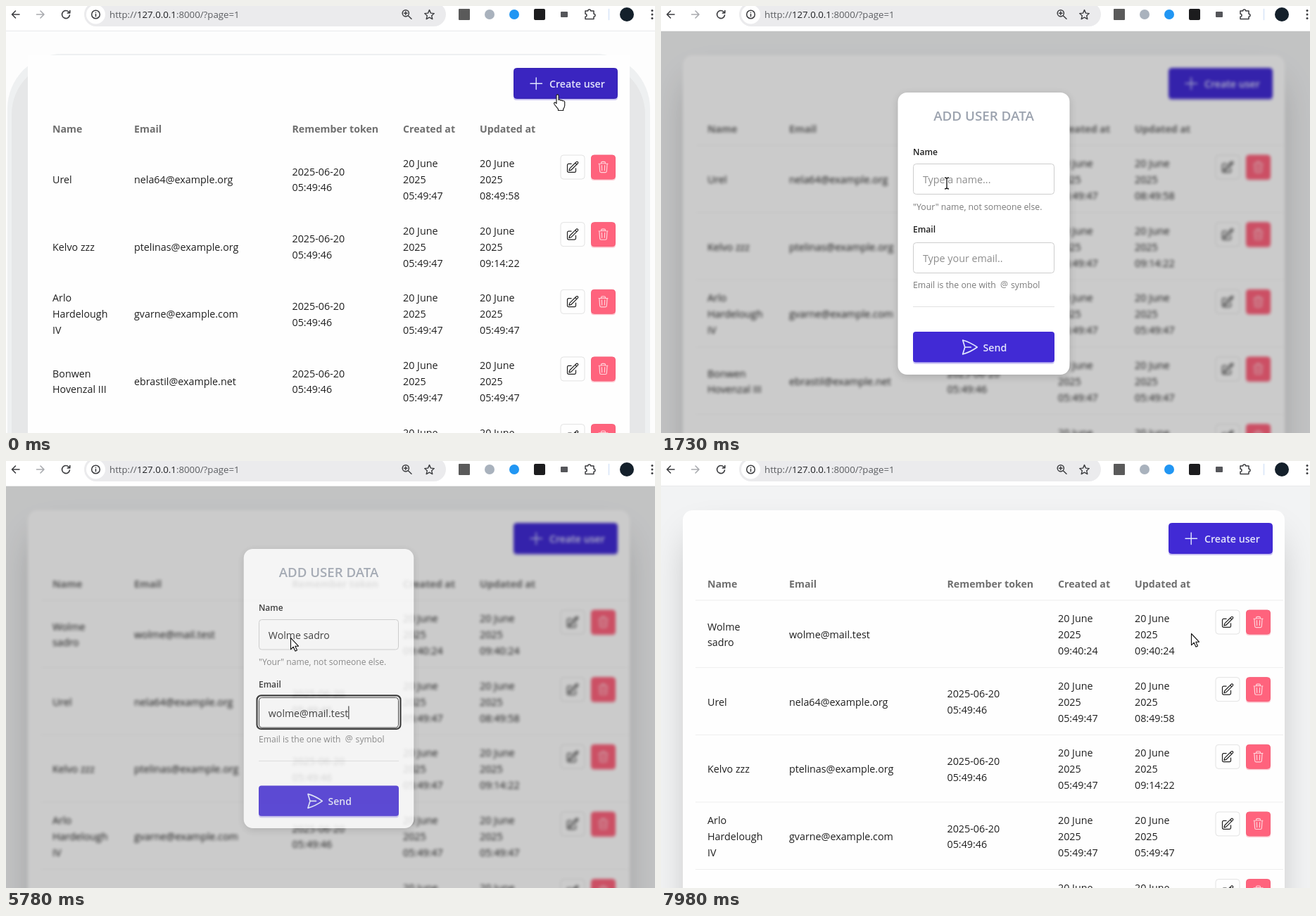
These frames come from a looping animation (922 px wide and 607 px high, 8 s). An HTML page:

```html
<!DOCTYPE html>
<html lang="en">
<head>
<meta charset="utf-8">
<title>User table</title>
<style>
  html, body { margin: 0; width: 100%; height: 100%; overflow: hidden; background: #fff; }
  svg { display: block; width: 922px; height: 607px; }
  text { font: 14.3px "Open Sans", "Noto Sans", sans-serif; fill: #1f1f1f; white-space: pre; }
  .head { font-weight: 700; font-size: 14.2px; fill: #6f6f6f; }
  .btn { font-weight: 600; font-size: 14.2px; fill: #e3e5fb; }
  .title { font-weight: 600; font-size: 18.8px; fill: #9ca3af; text-anchor: middle; }
  .label { font-weight: 600; font-size: 12.1px; }
  .hint { font-size: 12.25px; fill: #7b7b7b; }
  .url { font-size: 13.25px; fill: #5c5e62; }
  .line { fill: none; stroke-linecap: round; stroke-linejoin: round; }
</style>
</head>
<body>
<svg id="stage" viewBox="0 0 922 607"></svg>
<script>
const LOOP = 8000;
const PERSON = "Wolme sadro", MAIL = "wolme@mail.test";
const PITCH = 95.65;
const STAMP = "05:49:47";

// name lines, email, has token, created, updated
const rows = [
  [["Urel"], "nela64@example.org", 1, STAMP, "08:49:58"],
  [["Kelvo zzz"], "ptelinas@example.org", 1, STAMP, "09:14:22"],
  [["Arlo", "Hardelough", "IV"], "gvarne@example.com", 1, STAMP, STAMP],
  [["Bonwen", "Hovenzal III"], "ebrastil@example.net", 1, STAMP, STAMP],
  [[], "", 0, STAMP, STAMP]
];
const added = [PERSON.split(" "), MAIL, 0, "09:40:24", "09:40:24"];

const text = (x, y, s, cls = "") => `<text x="${x}" y="${y}" class="${cls}">${s}</text>`;
const rect = (x, y, w, h, r, fill, extra = "") =>
  `<rect x="${x}" y="${y}" width="${w}" height="${h}" rx="${r}" fill="${fill}" ${extra}/>`;
const circle = (x, y, r, fill, extra = "") => `<circle cx="${x}" cy="${y}" r="${r}" fill="${fill}" ${extra}/>`;
const line = (d, color, width = 1.5, extra = "") =>
  `<path class="line" d="${d}" stroke="${color}" stroke-width="${width}" ${extra}/>`;
const icon = (d, cx, cy, scale, color) =>
  line(d, color, 1.5, `transform="translate(${cx} ${cy}) scale(${scale}) translate(-12 -12)"`);
const stack = (x, mid, lines) =>
  lines.map((s, i) => text(x, mid + (i - (lines.length - 1) / 2) * 22.9, s)).join("");

const PENCIL = "M16.9 4.5l1.7-1.7a1.9 1.9 0 1 1 2.6 2.7L10.6 16.1a4.5 4.5 0 0 1-1.9 1.1L6 18l.8-2.7a4.5 4.5 0 0 1 1.1-1.9zM16.9 4.5l2.6 2.6M18 14v4.8A2.2 2.2 0 0 1 15.8 21H5.2A2.2 2.2 0 0 1 3 18.8V8.2A2.2 2.2 0 0 1 5.2 6H10";
const TRASH = "M9.3 9l.3 9M14.7 9l-.3 9M3.8 6Q12 4.6 20.3 6M4.8 6l1 13.7Q6 21.7 8 21.7h8Q18 21.7 18.2 19.7L19.2 6M8.2 5.3V4.5Q8.2 2.3 10.3 2.3h3.4Q15.8 2.3 15.8 4.5V5.3";
const PLANE = "M6 12L3.3 3.1A59.8 59.8 0 0 1 21.5 12 59.8 59.8 0 0 1 3.3 20.9L6 12h7.5";

function table(list) {
  return list.slice(0, 5).map(([name, mail, token, made, changed], i) => {
    const mid = 252 + i * PITCH;
    const day = ["20 June", "2025"];
    return stack(66, mid, name) + text(182, mid, mail) +
      (token ? stack(406.5, mid, ["2025-06-20", "05:49:46"]) : "") +
      stack(564, mid, [...day, made]) + stack(673, mid, [...day, changed]);
  }).join("");
}

function rowButtons(i) {
  const y = 211.5 + i * PITCH;
  return rect(788, y + .5, 34, 34, 4, "#fefefe", 'stroke="#e3e3e3"') +
    icon(PENCIL, 804.7, y + 17.7, .8, "#222") +
    rect(831, y + 1.5, 35, 35, 4, "#ff637d", 'opacity=".35"') +
    rect(831.5, y + .5, 34, 34, 4, "#ff637d", 'stroke="#f65f78"') +
    icon(TRASH, 848.5, y + 17.5, .78, "#ffd5dc");
}

function toolbar() {
  const dark = "#3c3d40";
  return rect(0, 0, 922, 35.5, 0, "#fff") +
    rect(111, -5, 514, 34, 17, "#ebebed") + circle(127.5, 12, 13.5, "#fff") +
    line("M19 12H8.5M13.5 7L8.5 12l5 5", dark, 1.6) +
    line("M43.5 12H54M49 7l5 5-5 5", "#a9abaf", 1.6) +
    line("M89.5 8.8A5.5 5.5 0 1 0 90.5 13M90.8 6.5V10H87.3", dark, 1.6) +
    circle(127.5, 12, 5.8, "none", `stroke="${dark}" stroke-width="1.5"`) +
    line("M127.5 11.5V14.8M127.5 9.2v.1", dark, 1.6) +
    `<text class="url" x="147" y="17">http://<tspan fill="#202124">127.0.0.1</tspan>:8000/?page=1</text>` +
    circle(567.8, 10.3, 4.6, "none", `stroke="${dark}" stroke-width="1.5"`) +
    line("M571.3 13.8L576 18.2M565.6 10.3h4.4M567.8 8.1v4.4", dark) +
    line("M601.5 5.6l2 4.5 4.8.5-3.6 3.2 1.1 4.8-4.3-2.5-4.3 2.5 1.1-4.8-3.6-3.2 4.8-.5z", dark, 1.4) +
    rect(643, 4, 16, 16, 1, "#5a5a5a") + circle(687, 12, 7, "#a9b2bd") +
    circle(722, 12, 7, "#2196f3") + rect(750, 4, 16, 16, 2, "#1c1c1e") +
    rect(788, 8, 10, 8, 1, "#55565a") +
    line("M823 7h3.7a2 2 0 0 1 4 0h4.3v4.2a2 2 0 0 1 0 4V18.5H823v-3.3a2 2 0 0 0 0-4z", dark, 1.5) +
    line("M856.5 4.5v15", "#d5e3f7", 1.4) + circle(882, 12, 10, "#14202b") +
    [6.5, 12, 17.5].map(y => circle(918, y, 1.5, dark)).join("");
}

function field(id, y, placeholder) {
  return `<g id="${id}">` +
    rect(355.5, y - 2.5, 206, 48, 6, "none", 'class="ring" stroke="#1d1d1d" stroke-width="2.2"') +
    rect(358.5, y + .5, 200, 43, 4, "#fff", 'class="edge"') +
    `<text class="value" x="372" y="${y + 28.2}" data-hint="${placeholder}"></text>` +
    line(`M0 ${y + 13}v18`, "#111", 1.1, 'data-caret="1"') + "</g>";
}

function dialog() {
  return rect(337, 126, 243.5, 401, 13, "#000", 'opacity=".16" filter="url(#soft)"') +
    rect(336.5, 123, 244, 401, 13, "#fff") + text(458.5, 163, "ADD USER DATA", "title") +
    text(358, 211.6, "Name", "label") + field("name", 224, "Type a name...") +
    text(358, 289.7, '"Your" name, not someone else.', "hint") +
    text(358, 322.2, "Email", "label") + field("mail", 336, "Type your email..") +
    text(358, 400.5, "Email is the one with", "hint") + text(482, 400, "@", "hint") +
    text(497, 400.5, "symbol", "hint") +
    rect(358, 427, 201, 1, 0, "#e2e2e2") +
    rect(358, 465, 201, 44, 4, "#412ad5", 'opacity=".25"') +
    rect(358, 463, 201, 43.5, 4, "#412ad5") +
    icon(PLANE, 438.5, 485, 1.13, "#e0e7ff") + text(457.5, 490.6, "Send", "btn");
}

document.getElementById("stage").innerHTML = `
  <defs>
    <filter id="shade" filterUnits="userSpaceOnUse" x="-90" y="0" width="1100" height="900"><feGaussianBlur stdDeviation="27.5"/></filter>
    <filter id="soft" filterUnits="userSpaceOnUse" x="300" y="90" width="320" height="480"><feGaussianBlur stdDeviation="6"/></filter>
    <filter id="blur" filterUnits="userSpaceOnUse" x="-20" y="10" width="962" height="640" color-interpolation-filters="sRGB"><feGaussianBlur id="blurSize" stdDeviation="0"/></filter>
    <clipPath id="view"><rect y="35.5" width="922" height="572"/></clipPath>
  </defs>
  <g clip-path="url(#view)">
    <g id="page">
      <g id="flat">${rect(-20, 0, 962, 650, 0, "#fdfdfd") +
        rect(2, 68, 913, 700, 78, "#eef0f1") + rect(8, 79, 900, 700, 75, "#e6e7e8") +
        rect(31, 70, 855, 700, 0, "#fefefe")}</g>
      <g id="deep">${rect(-20, 0, 962, 650, 0, "#f2f3f4") +
        rect(44, 110, 829, 700, 13, "#000", 'opacity=".25" filter="url(#shade)"') +
        rect(31, 70, 855, 700, 14, "#fefefe") +
        [0, 1, 2, 3, 4].map(i => rect(49, 197.5 + i * PITCH, 835, 1, 0, "#eeeeee")).join("")}</g>
      ${rect(721, 90, 148, 44, 4, "#412ad5", 'id="lift" opacity=".28"')}
      ${rect(721.5, 88.5, 147, 43, 4, "#412ad5", 'id="create" stroke="#3a25bd"')}
      ${line("M753.2 102v16.5M745 110.2h16.5", "#e0e7ff", 1.4)}
      ${text(772, 115.6, "Create user", "btn")}
      ${[[66, "Name"], [182, "Email"], [406.5, "Remember token"], [564, "Created at"], [673, "Updated at"]]
        .map(([x, s]) => text(x, 179.7, s, "head")).join("")}
      <g id="before">${table(rows)}</g>
      <g id="after">${table([added, ...rows])}</g>
      ${[0, 1, 2, 3, 4].map(rowButtons).join("")}
    </g>
    ${rect(0, 35, 922, 572, 0, "#000", 'id="dim"')}
    <g id="dialog">${dialog()}</g>
  </g>
  ${toolbar()}
  ${rect(0, 35, 922, 1, 0, "#e8e9eb", 'id="rule"')}
  <g id="cursor" stroke-linejoin="round">
    <path id="arrow" d="M.5 .5V16.8L4.2 13.2 7 19.2 9.5 18 6.8 12.2H11.5Z" fill="#fff" stroke="#111" stroke-width="1.1"/>
    <path id="hand" d="M-1.5 1.5Q0-.6 1.5 1.5V8Q3.2 7 4.4 8.6 6 7.8 7.2 9.4 9.2 8.8 10.2 10.8V16Q10 19 8.2 21V23H1V21.2L-4.3 14.5Q-5.6 12.3-4 11.6-2.6 11.4-1.5 13.2Z" fill="#fff" stroke="#222" stroke-width="1.2"/>
    <path id="beam" d="M-1-7Q1.5-7 2-5.5 2.5-7 5-7M2-5.5V7.5M-1 9Q1.5 9 2 7.5 2.5 9 5 9" fill="none" stroke="#111" stroke-width="1.3"/>
  </g>`;

const $ = id => document.getElementById(id);
const clamp = (v, lo, hi) => Math.min(hi, Math.max(lo, v));
const show = (id, on) => $(id).style.display = on ? "" : "none";
// number of even steps taken since start, up to n
const run = (t, start, gap, n) => clamp(Math.floor((t - start) / gap) + 1, 0, n);

const path = [
  [600, 783.5, 125.5], [1070, 818, 126], [1270, 818, 126], [1400, 741, 147],
  [1730, 404, 251], [7050, 404, 251], [7330, 560, 284], [7600, 786, 292],
  [7740, 775, 262], [7850, 742, 243], [7920, 747, 245], [7980, 753, 245]
];

function pointer(t) {
  const i = path.findIndex(k => k[0] > t);
  if (i === 0) return path[0].slice(1);
  if (i < 0) return path[path.length - 1].slice(1);
  const [a, b] = [path[i - 1], path[i]], p = (t - a[0]) / (b[0] - a[0]);
  return [a[1] + (b[1] - a[1]) * p, a[2] + (b[2] - a[2]) * p];
}

function fill(id, typed, focused) {
  const box = $(id), value = box.querySelector(".value"), edge = box.querySelector(".edge");
  const caret = box.querySelector("[data-caret]");
  value.textContent = typed || value.dataset.hint;
  value.style.fill = typed ? "#222" : "#8d8d8d";
  box.querySelector(".ring").style.display = caret.style.display = focused ? "" : "none";
  edge.setAttribute("stroke", focused ? "#2a2a2a" : "#cdcdcd");
  const x = 372.5 + (typed ? value.getComputedTextLength() : 0);
  caret.setAttribute("transform", `translate(${x} 0)`);
}

function draw(t) {
  const opening = t >= 1130, closed = t >= 6050, saved = t >= 5720;
  const p = clamp((run(t, 1130, 67.5, 5) - 1) / 4, 0, 1);
  const out = 1 - run(t, 5720, 65, 5) / 5;

  show("flat", !opening);
  show("deep", opening);
  show("rule", !opening || closed);
  show("before", !saved);
  show("after", saved);
  show("lift", t < 70 || opening);
  $("create").setAttribute("fill", opening ? "#412ad5" : "#3a25c0");
  $("create").setAttribute("stroke", opening ? "#3f29cf" : "#3522b0");

  const veil = closed ? 0 : p;
  $("dim").setAttribute("opacity", veil * .2);
  $("blurSize").setAttribute("stdDeviation", 1.9 * veil ** 2);
  if (veil > .3) $("page").setAttribute("filter", "url(#blur)");
  else $("page").removeAttribute("filter");

  const scale = .95 + .05 * p * out;
  $("dialog").setAttribute("opacity", p ** 1.9 * out);
  $("dialog").setAttribute("transform", `translate(458.5 323.5) scale(${scale}) translate(-458.5 -323.5)`);
  show("dialog", p * out > 0);

  const nameCount = run(t, 2130, 91, 9) + run(t, 3060, 70, 2);
  const mailCount = run(t, 4050, 1, 1) + run(t, 4190, 86, 4) + run(t, 4590, 100, 5) +
    Math.ceil(run(t, 5190, 130, 3) * 5 / 3);
  fill("name", PERSON.slice(0, nameCount), t >= 1870 && t < 3520);
  fill("mail", MAIL.slice(0, mailCount), t >= 3520);

  const [x, y] = pointer(t);
  const shape = !opening ? "hand" : t >= 1660 && !saved ? "beam" : "arrow";
  for (const id of ["hand", "beam", "arrow"]) show(id, id === shape);
  $("cursor").setAttribute("transform", `translate(${x} ${y})`);
}

const start = performance.now();
function tick() {
  draw((performance.now() - start) % LOOP);
  requestAnimationFrame(tick);
}
tick();
</script>
</body>
</html>
```
